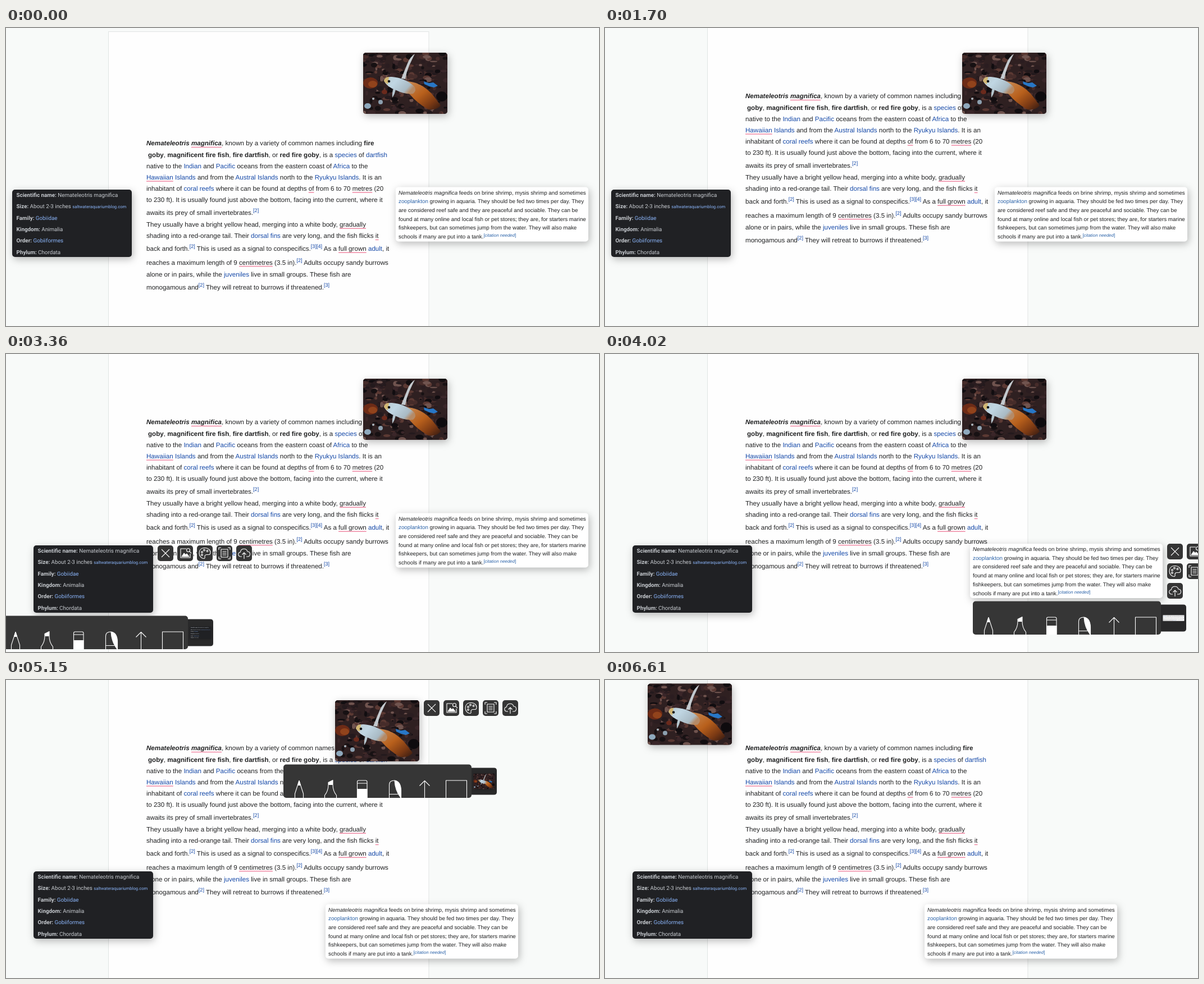
Recreate the animation shown at these times as an HTML page. Size 1056x531 px, loop 8470 ms.

```html
<!DOCTYPE html>
<html lang="en">
<head>
<meta charset="utf-8">
<title>Floating notes over an article</title>
<style>
html, body { margin: 0; width: 100%; height: 100%; overflow: hidden; background: #f8faf9; }
svg { display: block; width: 1056px; height: 531px; }
text { font-family: "Liberation Sans", Arial, sans-serif; text-rendering: geometricPrecision; }
.article { font-size: 11.6px; fill: #202122; }
.facts { font-family: Roboto, sans-serif; font-size: 9.8px; fill: #c6cacf; }
.care { font-size: 9.8px; fill: #202122; }
.b { font-weight: bold; }
.i { font-style: italic; }
.a { fill: #1549a8; }
.s { fill: #1549a8; font-size: 9.1px; baseline-shift: 4.6px; }
.care .a, .care .s { fill: #2a62a8; }
.care .s { font-size: 7.9px; baseline-shift: 3.4px; }
.facts .a { fill: #8ab4f8; }
.facts .m { fill: #8ab4f8; font-size: 7.7px; }
.back { filter: drop-shadow(2px 4px 7px rgba(0, 0, 0, .27)); }
.line { fill: none; stroke: #fff; stroke-width: 1.1; stroke-linejoin: round; }
.solid { fill: #fff; }
</style>
</head>
<body>
<svg id="stage" viewBox="0 0 1056 531"></svg>
<script>
const LOOP = 8470;
const stage = document.getElementById('stage');

// One-letter tags in the copy become styled spans.
const rich = s => s.replace(/<(\w)>/g, '<tspan class="$1">').replace(/<\/\w>/g, '</tspan>');
const textLine = (cls, x, y, s) => `<text class="${cls}" x="${x}" y="${y}">${rich(s)}</text>`;

const article = [
  [209.3, '<b><i>Nemateleotris <u>magnifica</u></i></b>, known by a variety of common names including <b>fire</b>'],
  [229.5, '<b>goby</b>, <b>magnificent fire fish</b>, <b>fire dartfish</b>, or <b>red fire goby</b>, is a <a>species</a> of <a>dartfish</a>', 253],
  [249.5, 'native to the <a>Indian</a> and <a>Pacific</a> oceans from the eastern coast of <a>Africa</a> to the'],
  [269.8, '<a><u>Hawaiian</u> Islands</a> and from the <a>Austral Islands</a> north to the <a>Ryukyu Islands</a>. It is an'],
  [289.8, 'inhabitant of <a>coral reefs</a> where it can be found at depths <u>of</u> from 6 to 70 <u>metres</u> (20'],
  [310, 'to 230 ft). It is usually found just above the bottom, facing into the current, where it'],
  [332.5, 'awaits its prey of small invertebrates.<s>[2]</s>'],
  [354, 'They usually have a bright yellow head, merging into a white body, <u>gradually</u>'],
  [374.2, 'shading into a red-orange tail. Their <a>dorsal fins</a> are very long, and the fish flicks <u>it</u>'],
  [397, 'back and forth.<s>[2]</s> This is used as a signal to conspecifics.<s>[3][4]</s> As a <u>full grown</u> <a>adult</a>, it'],
  [421.5, 'reaches a maximum length of 9 <u>centimetres</u> (3.5 in).<s>[2]</s> Adults occupy sandy burrows'],
  [443, 'alone or in pairs, while the <a>juveniles</a> live in small groups. These fish are'],
  [465.7, 'monogamous and<s>[2]</s> They will retreat to burrows if threatened.<s>[3]</s>'],
].map(([y, s, x = 250]) => textLine('article', x, y, s)).join('');

const facts = [
  '<b>Scientific name:</b> Nemateleotris magnifica',
  '<b>Size:</b> About 2-3 inches <m>saltwateraquariumblog.com</m>',
  '<b>Family:</b> <a>Gobiidae</a>',
  '<b>Kingdom:</b> Animalia',
  '<b>Order:</b> <a>Gobiiformes</a>',
  '<b>Phylum:</b> Chordata',
].map((s, i) => textLine('facts', 7.6, 12.8 + i * 20.35, s)).join('');

const care = [
  '<i>Nemateleotris magnifica</i> feeds on brine shrimp, mysis shrimp and sometimes',
  '<a>zooplankton</a> growing in aquaria. They should be fed two times per day. They',
  'are considered reef safe and they are peaceful and sociable. They can be',
  'found at many online and local fish or pet stores; they are, for starters marine',
  'fishkeepers, but can sometimes jump from the water. They will also make',
  'schools if many are put into a tank.<s>[<i>citation needed</i>]</s>',
].map((s, i) => textLine('care', 5, 13 + i * 15.7, s)).join('');

function reef() {
  let seed = 11;
  const rnd = n => (seed = seed * 16807 % 2147483647) / 2147483647 * n;
  const tones = ['#171113', '#2b1d20', '#462c2a', '#5b3933', '#241a1d', '#70544f', '#110d10', '#3a2629'];
  let out = '';
  for (let i = 0; i < 230; i++) {
    const tone = tones[Math.floor(rnd(tones.length))];
    out += `<ellipse cx="${rnd(150).toFixed(1)}" cy="${rnd(109).toFixed(1)}" rx="${(1.5 + rnd(6)).toFixed(1)}" ry="${(1 + rnd(4)).toFixed(1)}" fill="${tone}"/>`;
  }
  return out;
}

const spot = (x, y, rx, ry, fill) => `<ellipse cx="${x}" cy="${y}" rx="${rx}" ry="${ry}" fill="${fill}"/>`;
const photo = `<g clip-path="url(#frame)"><rect width="150" height="109" fill="#2f2021"/>
  <g filter="url(#soft)">${reef()}
  ${spot(13, 54, 13, 10, '#6d2b16')}${spot(17, 56, 8, 6, '#91431c')}${spot(38, 70, 5, 4, '#6b2a1c')}
  ${spot(8, 95, 6, 5, '#8fa9bd')}${spot(31, 88, 4, 4, '#8c9fae')}${spot(18, 82, 2, 2, '#a9b5bd')}
  ${spot(140, 78, 10, 9, '#0e0b0e')}${spot(82, 7, 6, 5, '#120e10')}
  <path d="M108 51l9 3 8-1 8 6-7 3-8-2-9-4z" fill="#2877c6"/></g>
  <path d="M68 46Q74 31 79 19Q83 8 92 2Q87 12 82 23Q77 35 75 47Z" fill="#c3c9ce"/>
  <path d="M55 62Q51 69 52 80Q57 73 58 64Z" fill="#b6c6cf"/>
  <path d="M76 51Q101 51 122 73Q132 85 138 94Q131 103 116 101Q97 91 82 73Z" fill="url(#tail)"/>
  <path d="M37 50Q41 42 51 43Q75 45 91 60Q96 67 89 73Q75 75 59 67Q42 61 37 50Z" fill="url(#skin)"/>
  <path d="M37 50Q39 43 46 43L44 56Q39 54 37 50Z" fill="#d2b774"/>
  <circle cx="46" cy="51" r="2.3" fill="#101317"/></g>`;

const buttonIcons = [
  '<path d="M7 7L21 21M21 7L7 21"/>',
  '<path d="M16 6H6V22H23V15"/><circle cx="19.5" cy="8.5" r="3"/><path d="M21.7 10.7L25 14"/><path class="solid" d="M8 20l4-6 3 3 2-2 4 5z"/>',
  '<path d="M14 4.500C7 4.500 4 9 4 14s4 9.500 8 9.500c3 0 2-3 2-4 0-2 2-3 4-3h3c3 0 3-3 3-4 0-5-5-8-10-8z"/><circle cx="9" cy="12" r="1.400"/><circle cx="13" cy="8.500" r="1.400"/><circle cx="18.500" cy="10" r="1.400"/><circle cx="9" cy="17" r="1.400"/>',
  '<path d="M4 8V4H8M20 4H24V8M24 20V24H20M8 24H4V20M8 7H20V21H8ZM10.500 11H17.500M10.500 14H17.500M10.500 17H17.500"/>',
  '<path d="M10 20H8C3 20 2 13 7.500 12C8 5 18 4 20 11C26 11 26 20 20.500 20H18M14 24V13M10.500 16.500L14 13L17.500 16.500"/>',
];

const pens = `<g class="line">
  <path d="M28 29L20.500 52V60M28 29L35.500 52V60"/><path class="solid" d="M28 29l-2.500 8h5z"/>
  <path d="M73.500 60V55Q80 47 80 36H88Q88 47 94.500 55V60"/><path class="solid" d="M80 35V32L88 28V35Z"/>
  <path d="M131.500 60V31Q131.500 28.500 134 28.500H146.500Q149 28.500 149 31V60M131.500 33.500H149"/><path class="solid" d="M131.500 44H149V60H131.500Z"/>
  <path d="M188.500 60V36Q188.500 28.500 198 28.500M188.500 53H204"/><path class="solid" d="M198 28.500Q209 30 209.500 46V60Q199 47 198 28.500Z"/>
  <path d="M251.500 60V29M242.500 38L251.500 29L260.500 38"/><path d="M289.500 60V28.500H326.500V60"/></g>`;

const cards = [
  {
    id: 'facts', w: 213, h: 120, cols: 5, fill: '#202124', body: facts,
    place: [[2563, 11, 288], [2700, 18, 297], [2900, 43, 332], [3030, 49, 341]],
    fade: [[2093, 0], [2360, 1], [3360, 1], [3560, 0]],
  },
  {
    id: 'care', w: 343, h: 97, cols: 2, fill: '#fff', body: care,
    place: [[3760, 694, 283.5], [4018, 650, 338], [4150, 616, 370], [4410, 569, 399.3]],
    fade: [[3530, 0], [3750, 1], [4613, 1], [4880, 0]],
  },
  {
    id: 'photo', w: 150, h: 109, cols: 5, fill: '#2f2021', body: photo,
    place: [[5013, 636, 44], [5150, 585, 36], [5350, 345, 2], [5547, 179, -7], [5700, 110, -2], [5880, 78, 3], [6080, 76, 6.5]],
    fade: [[4680, 0], [4940, 1], [6343, 1], [6610, 0]],
  },
];

function toolsMarkup({ id, w, h, cols }) {
  const buttons = buttonIcons.map((icon, i) =>
    `<g transform="translate(${w + 8 + i % cols * 35} ${Math.floor(i / cols) * 35})">
      <rect width="28" height="28" rx="5" fill="#353535"/><g class="line">${icon}</g></g>`).join('');
  const k = 38 / w;
  return `${buttons}<g transform="translate(${Math.round(w / 2 - 167)} ${h + 5.5})">
    <path d="M335 6H375Q380 6 380 11V49Q380 54 375 54H335Z" fill="#29292a"/>
    <use href="#${id}" transform="translate(338.500 ${30 - h * k / 2}) scale(${k})"/>
    <rect width="335" height="59.500" rx="5" fill="#363636"/>
    <g clip-path="url(#bar)">${pens}</g></g>`;
}

stage.innerHTML = `<defs>
  <clipPath id="frame"><rect width="150" height="109" rx="5"/></clipPath>
  <clipPath id="bar"><rect width="335" height="59.500" rx="5"/></clipPath>
  <filter id="soft"><feGaussianBlur stdDeviation=".7"/></filter>
  <linearGradient id="skin" x2="1" y2=".5"><stop stop-color="#b9c9cf"/><stop offset=".4" stop-color="#c0d6e3"/><stop offset=".85" stop-color="#a9bac4"/><stop offset="1" stop-color="#b58a66"/></linearGradient>
  <linearGradient id="tail" x2="1" y2="1"><stop stop-color="#c98d58"/><stop offset=".45" stop-color="#b8601c"/><stop offset=".75" stop-color="#7c3a14"/><stop offset="1" stop-color="#341a12"/></linearGradient>
</defs>
<rect width="1056" height="531" fill="#f8faf9"/>
<g id="page"><rect x="182.500" y="6.500" width="570.500" height="800" fill="#fefefe" stroke="#e1e4e3"/>${article}</g>
${cards.map(c => `<g class="card"><g id="${c.id}">
  <rect class="back" width="${c.w}" height="${c.h}" rx="5" fill="${c.fill}"/>${c.body}</g>
  <g class="tools">${toolsMarkup(c)}</g></g>`).join('')}`;

// Proofing marks sit under the measured words.
stage.querySelectorAll('#page .u').forEach(word => {
  const p = word.getStartPositionOfChar(0);
  const mark = document.createElementNS(stage.namespaceURI, 'rect');
  const attrs = { x: p.x, y: p.y + 2.3, width: word.getComputedTextLength(), height: 1.7, fill: '#f296ae' };
  for (const key in attrs) mark.setAttribute(key, attrs[key]);
  document.getElementById('page').append(mark);
});

const page = document.getElementById('page');
const groups = [...stage.querySelectorAll('.card')];
const scroll = [[1033, 0], [1240, -70], [1433, -70], [1700, -84]];

// Bursts of movement: start, end, number of ticks.
const bursts = [[1100, 1240, 3], [1500, 1700, 4], [2160, 2360, 4], [2630, 3030, 7], [3360, 4150, 13],
  [4220, 4410, 4], [4680, 4940, 5], [5080, 5880, 13], [5940, 6080, 3], [6410, 6610, 4]];

function tickTime(t) {
  const burst = bursts.filter(b => t >= b[0]).pop();
  if (!burst) return 0;
  const [start, end, count] = burst;
  const step = (end - start) / (count - 1);
  return Math.min(end, start + Math.floor((t - start + 8) / step) * step);
}

function at(keys, t) {
  const next = keys.findIndex(k => k[0] > t);
  if (next === 0) return keys[0].slice(1);
  if (next < 0) return keys[keys.length - 1].slice(1);
  const a = keys[next - 1], b = keys[next];
  const f = (t - a[0]) / (b[0] - a[0]);
  return a.slice(1).map((v, i) => v + (b[i + 1] - v) * f);
}

function draw(now) {
  const t = tickTime(now % LOOP);
  page.setAttribute('transform', `translate(0 ${Math.round(at(scroll, t)[0])})`);
  cards.forEach((card, i) => {
    const [x, y] = at(card.place, t);
    const [opacity] = at(card.fade, t);
    const tools = groups[i].querySelector('.tools');
    groups[i].setAttribute('transform', `translate(${Math.round(x)} ${Math.round(y * 2) / 2})`);
    tools.setAttribute('opacity', opacity);
    tools.setAttribute('display', opacity > 0 ? 'inline' : 'none');
  });
}

const began = performance.now();
function loop() {
  draw(performance.now() - began);
  requestAnimationFrame(loop);
}
loop();
</script>
</body>
</html>
```
